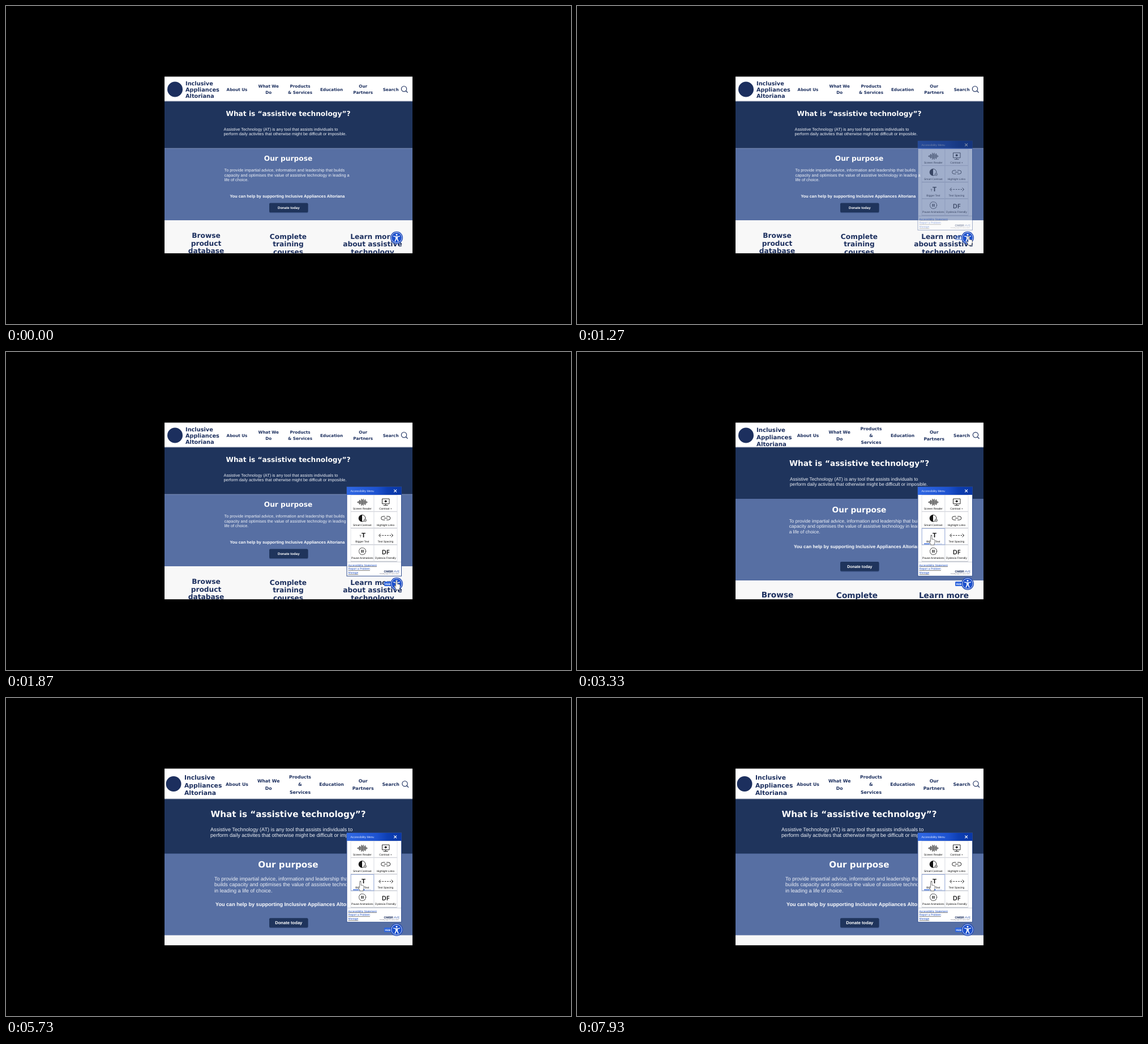
Animation, 998 px wide and 561 px high, one loop 8000 ms. Source, as an HTML page:

```html
<!DOCTYPE html>
<html lang="en">
<head>
<meta charset="utf-8">
<title>Bigger text demo</title>
<style>
html, body { margin: 0; width: 100%; height: 100%; overflow: hidden; background: #000; }
svg { display: block; width: 100vw; height: 100vh; text-rendering: geometricPrecision; }
.title { font-family: "DejaVu Sans", Verdana, sans-serif; font-weight: 700; }
.body, .strong { font-family: "Liberation Sans", Arial, sans-serif; }
.strong { font-weight: 700; }
.icon { fill: none; stroke: #111; stroke-width: .9; }
</style>
</head>
<body>
<svg id="stage" viewBox="0 0 998 561">
  <defs>
    <clipPath id="page"><rect x="280" y="124.7" width="438" height="311.6"/></clipPath>
    <linearGradient id="bar">
      <stop offset="0" stop-color="#3068e4"/><stop offset=".55" stop-color="#1d52cf"/>
      <stop offset=".75" stop-color="#0d3eb2"/><stop offset="1" stop-color="#0a37a5"/>
    </linearGradient>
  </defs>
</svg>
<script>
const NAVY = '#1f345c', INK = '#1c2f5e', BLUE = '#576fa3', LINK = '#1d4fc4';
const LOOP = 8000, GROW = [0, 2670, 5670];
const stage = document.getElementById('stage');

// y is the middle of the capital letters
const text = (str, x, y, size, fill, cls = 'body', anchor = 'start') =>
  `<text class="${cls}" x="${x}" y="${y + size * .36}" font-size="${size}" fill="${fill}" text-anchor="${anchor}">${str}</text>`;
const lines = (list, x, y, gap, ...style) =>
  list.map((str, i) => text(str, x, y + i * gap, ...style)).join('');
const rect = (x, y, w, h, fill, extra = '') =>
  `<rect x="${x}" y="${y}" width="${w}" height="${h}" fill="${fill}" ${extra}/>`;
const circle = (x, y, r, fill, extra = '') =>
  `<circle cx="${x}" cy="${y}" r="${r}" fill="${fill}" ${extra}/>`;
const path = (d, extra = 'class="icon"') => `<path d="${d}" ${extra}/>`;

const PURPOSE = [
  ['To provide impartial advice, information and leadership that builds',
   'capacity and optimises the value of assistive technology in leading a', 'life of choice.'],
  ['To provide impartial advice, information and leadership that builds',
   'capacity and optimises the value of assistive technology in leading', 'a life of choice.'],
  ['To provide impartial advice, information and leadership that',
   'builds capacity and optimises the value of assistive technology', 'in leading a life of choice.']];

const LAYOUTS = [
  { head: 168, navy: 251, blue: 378, title: 12.2, body: 7.33, gap: 8.7,
    logo: [298.5, 147, 13.5], brand: [317, 136.8, 10.8, 9.75], nav: [147.2, 11, 7.2], find: [703, 146.2],
    what: 189.6, about: [384.5, 217], ours: 268.7, purpose: [385.5, 289.2],
    help: [395.5, 335.2], button: [347.5, 6.1], cards: [353.5, 404.8, 498.5, 647.5] },
  { head: 168, navy: 259, blue: 403, title: 13.7, body: 8.22, gap: 9.8,
    logo: [298.5, 147, 13.5], brand: [317, 137.8, 12.2, 10.2], nav: [147.2, 12.1, 7.55], find: [704, 146.3],
    what: 196.3, about: [376, 223.7], ours: 277.8, purpose: [374.7, 297.6],
    help: [383, 343.5], button: [370, 7], cards: [354, 427.8, 494.5, 648] },
  { head: 178, navy: 274.5, blue: 418.5, title: 15.2, body: 9.13, gap: 10.6,
    logo: [296, 151.5, 13.5], brand: [315, 140.3, 13.4, 10.8], nav: [152.4, 13.3, 7.8], find: [704.5, 151.2],
    what: 204.6, about: [361, 231.5], ours: 294, purpose: [368, 318.4],
    help: [370, 364.2], button: [388.3, 7.6], cards: [354, 446, 494.5, 648] }];

function drawPage(p, step) {
  const [navY, navGap, navSize] = p.nav, [findX, findY] = p.find;
  const nav = (x, ...list) =>
    lines(list, x, navY - navGap * (list.length - 1) / 2, navGap, navSize, INK, 'title', 'middle');
  const card = (x, y, ...list) =>
    lines(list, x, y, p.title * 1.1, p.title, INK, 'title', 'middle');
  const [cardX, cardY, cardX2, cardX3] = p.cards;
  const [brandX, brandY, brandGap, brandSize] = p.brand;
  const [buttonY, buttonSize] = p.button;
  const services = step ? ['Products', '&amp;', 'Services'] : ['Products', '&amp; Services'];
  return rect(280, 124, 438, 313, '#f8f8f8') +
    rect(280, p.head, 438, p.blue - p.head, BLUE) +
    rect(280, p.head, 438, p.navy - p.head, NAVY) +
    (step ? '' : rect(280, p.navy - .3, 438, .8, '#8595bb')) +
    rect(280, 124, 438, p.head - 124, '#fff') + rect(280, p.head - .6, 438, 1, '#a3abbd') +
    circle(...p.logo, INK) +
    lines(['Inclusive', 'Appliances', 'Altoriana'], brandX, brandY, brandGap, brandSize, INK, 'title') +
    nav(408, 'About Us') + nav(463.7, 'What We', 'Do') + nav(519.5, ...services) +
    nav(575, 'Education') + nav(630.7, 'Our', 'Partners') + nav(679.6, 'Search') +
    path(`M${findX + 3.3} ${findY + 3.3}l3.2 3.4`, `stroke="${INK}" stroke-width="1.3"`) +
    circle(findX, findY, 4.7, 'none', `stroke="${INK}" stroke-width="1.1"`) +
    text('What is “assistive technology”?', 498.5, p.what, p.title, '#fff', 'title', 'middle') +
    lines(['Assistive Technology (AT) is any tool that assists individuals to',
      'perform daily activites that otherwise might be difficult or imposible.'],
      ...p.about, p.gap, p.body, '#eef1f7') +
    text('Our purpose', 498.5, p.ours, p.title, '#fff', 'title', 'middle') +
    lines(PURPOSE[step], ...p.purpose, p.gap, p.body, '#eef1f7') +
    text('You can help by supporting Inclusive Appliances Altoriana', ...p.help, p.body - .03, '#fff', 'strong') +
    rect(465, buttonY + 1, 68.7, 16.8, '#2f4677', 'rx="2.5" opacity=".6"') +
    rect(465, buttonY, 68.5, 16.4, NAVY, 'rx="2"') +
    text('Donate today', 499.3, buttonY + 8.2, buttonSize, '#fff', 'strong', 'middle') +
    card(cardX, cardY, 'Browse', 'product', 'database') +
    card(cardX2, cardY + 1.5, 'Complete', 'training', 'courses') +
    card(cardX3, cardY + 1.5, 'Learn more', 'about assistive', 'technology');
}

function drawMenu() {
  const labels = ['Screen Reader', 'Contrast +', 'Smart Contrast', 'Highlight Links',
    'Bigger Text', 'Text Spacing', 'Pause Animations', 'Dyslexia Friendly'];
  const cells = labels.map((label, i) => {
    const x = 609 + i % 2 * 41, y = 252.5 + (i >> 1) * 29.3;
    return rect(x, y, 41, 29, '#fff', 'stroke="#d5d8df" stroke-width=".7"') +
      rect(x, y + 28.4, 40.5, .8, '#b4b7bf') +
      text(label, x + 20.4, y + 23.3, 4.85, '#111', 'body', 'middle');
  }).join('');
  const wave = [1, 2, 4, 3, 6, 4.5, 6, 3.5, 5, 2.5, 1]
    .map((h, i) => `M${621.2 + i * 1.65} ${265 - h}v${h * 2}`).join('');
  return rect(602, 238, 96.5, 157.3, '#fff', 'stroke="#34508f" stroke-width="1"') +
    rect(602, 238, 96.5, 14, 'url(#bar)') +
    text('Accessibility Menu', 608.5, 245.2, 5.05, '#e6edff') +
    path('M685.2 242.6l4.8 4.8m0-4.8l-4.8 4.8', 'stroke="#fff" stroke-width="1.1"') +
    cells + path(wave) +
    path('M664.5 259h12.5v8.8h-12.5zM670.7 268v2.6M666.7 270.6h8') + circle(670.7, 263.3, 1.9, '#111') +
    circle(629, 293.3, 5.9, '#fff', 'class="icon" style="fill:#fff"') +
    path('M629 287.4a5.9 5.9 0 0 0 0 11.8z', 'fill="#111"') +
    circle(634.3, 297, 2.3, '#bbb', 'stroke="#666" stroke-width=".8"') +
    path('M669.5 290h-3.7a3 3 0 0 0 0 6.2h3.7M672 290h3.7a3 3 0 0 1 0 6.2H672M667.8 293.1h6') +
    text('T', 626, 324.5, 6, '#111', 'body', 'middle') + text('T', 631.6, 322.7, 11.5, '#111', 'strong', 'middle') +
    path('M661.5 320.6l-3 3 3 3M680.5 320.6l3 3-3 3') +
    path('M660 323.6h23', 'class="icon" stroke-dasharray="2.6 1.8"') +
    circle(629.5, 351.5, 6, 'none', 'class="icon" style="stroke-width:1.3" stroke-dasharray="1.2 1.16"') +
    path('M628.2 349v5M630.8 349v5', 'stroke="#111" stroke-width="1.3"') +
    `<text x="670.7" y="357" font-family="'Open Sans', sans-serif" font-weight="600" font-size="11" text-anchor="middle" fill="#111">DF</text>` +
    rect(602.5, 370, 95.5, .8, '#c3c8d4') +
    `<g text-decoration="underline">${lines(['Accessibility Statement', 'Report a Problem', 'Manage'], 604.6, 375.8, 6.9, 4.9, LINK)}</g>` +
    text('OMBR', 667.5, 386.7, 5.4, INK, 'strong') + text('AVE', 685, 386.7, 5.4, '#4a6bb4') +
    text('Friendly pages for every visitor', 660, 390.7, 2.5, '#556') +
    rect(668, 405, 16, 8, '#2f66dd', 'rx="1.5"') + text('Hide', 669.5, 409, 4.7, '#fff', 'strong');
}

const drawLevel = level =>
  rect(609.2, 311.4, 40.6, 28.6, 'none', 'stroke="#8ca5dd" stroke-width=".8"') +
  [0, 1, 2].map(i => rect(613 + i * 11, 337.7, 10, 1.3, i < level ? '#2b62db' : '#cfdaf3')).join('');

const accessButton = circle(690, 408.7, 11, '#1a46b8') +
  circle(690, 408.7, 9.3, '#1c50cc', 'stroke="#fff" stroke-width=".8"') + circle(690, 403.4, 1.5, '#fff') +
  path('M684.8 406.1l3.6 1h3.2l3.6-1M690 407v4M688.9 407.2v3.7l-1.7 4.2M691.1 407.2v3.7l1.7 4.2',
    'fill="none" stroke="#fff" stroke-width="1.5" stroke-linecap="round"');

const group = (id, inner) => `<g id="${id}">${inner}</g>`;
const outline = 'fill="#fff" stroke="#444" stroke-width=".7" stroke-linejoin="round"';
stage.insertAdjacentHTML('beforeend',
  `<g clip-path="url(#page)">${LAYOUTS.map((p, i) => group('page' + i, drawPage(p, i))).join('')}` +
  group('menu', drawMenu() + group('level1', drawLevel(1)) + group('level2', drawLevel(2))) + accessButton + '</g>' +
  group('cursor',
    group('arrow', path('M0 0V11l2.5-2.3 1.8 4 1.8-.8-1.8-3.9H8z', outline)) +
    group('hand', path('M-1.2 1.2a1.2 1.2 0 0 1 2.4 0v5l1-.4 1.3.7 1.3-.1 1.4 1.2v4l-1 2.6v2H-1v-1.8l-2.7-4.3q-.4-1.6 1-1.2l1.5 1.6z', outline))));

const el = id => document.getElementById(id);
const show = (id, on) => el(id).setAttribute('display', on ? 'inline' : 'none');
const clamp = v => Math.min(1, Math.max(0, v));

// time, x, y of the pointer's resting points
const ROUTE = [[70, 763, 414], [600, 702, 402], [850, 692, 406], [1800, 692, 406], [2450, 625.8, 324.2], [LOOP, 625.8, 324.2]];

function pointerAt(t) {
  const i = Math.max(1, ROUTE.findIndex(stop => stop[0] > t));
  const [t0, x0, y0] = ROUTE[i - 1], [t1, x1, y1] = ROUTE[i];
  const k = clamp((t - t0) / (t1 - t0)), ease = k * k * (3 - 2 * k);
  return [x0 + (x1 - x0) * ease, y0 + (y1 - y0) * ease];
}

function render(t) {
  const step = GROW.filter(start => t >= start).length - 1;
  LAYOUTS.forEach((_, i) => show('page' + i, i === step));
  show('level1', step === 1);
  show('level2', step === 2);
  el('menu').setAttribute('opacity', clamp((t - 1140) / 300));
  const [x, y] = pointerAt(t);
  const overControl = Math.hypot(x - 690, y - 408.7) < 11 || (x < 691 && y < 369);
  el('cursor').setAttribute('transform', `translate(${x} ${y})`);
  show('cursor', t >= 70);
  show('arrow', !overControl);
  show('hand', overControl);
}

function tick() {
  render(performance.now() % LOOP);
  requestAnimationFrame(tick);
}
tick();
</script>
</body>
</html>
```
